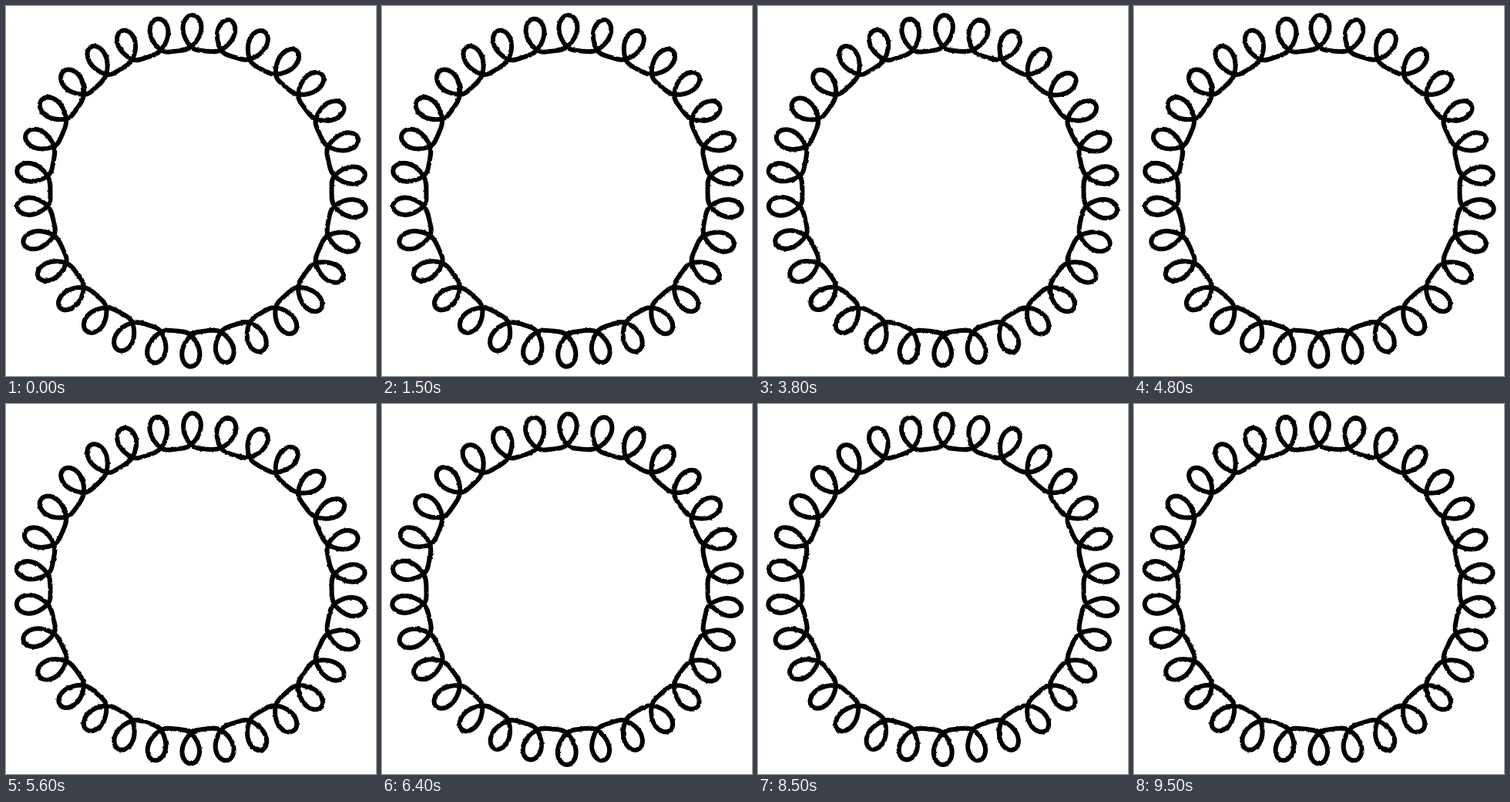
Animation, 480 px wide and 480 px high, one loop 9.6 s. Source, as an HTML page:

```html
<!DOCTYPE html>
<html lang="en">
<head>
<meta charset="utf-8">
<title>Wobbling loop ring</title>
<style>
  html, body { margin: 0; width: 100%; height: 100%; overflow: hidden; background: #fff; }
  svg { display: block; width: 100vw; height: 100vh; }
  path { fill: none; stroke: #000; stroke-width: 6; stroke-linejoin: round; }
</style>
</head>
<body>
<svg id="stage" viewBox="0 0 480 480"></svg>
<script>
const COUNT = 30, STEP = 2 * Math.PI / COUNT, MID = 240;
const KNOT = 187, VALLEY = 182.5, LENGTH = 40.3, WIDTH = 11.6;
const POSES = 3, POSE_MS = 100;

// Seeded generator of values from -1 to 1.
function random(seed) {
  return () => {
    seed = (seed * 16807) % 2147483647;
    return seed / 1073741823.5 - 1;
  };
}

const polar = (r, a) => [MID + r * Math.sin(a), MID - r * Math.cos(a)];

// Maps (outward, sideways) offsets from a point to stage points.
function frame([x, y], a) {
  const s = Math.sin(a), c = Math.cos(a);
  return (out, side) =>
    `${(x + s * out + c * side).toFixed(1)} ${(y - c * out + s * side).toFixed(1)} `;
}

function ringPath(pose) {
  const rnd = random(4211 + pose * 977);
  let d = "M" + polar(VALLEY, -STEP / 2).join(" ");
  for (let i = 0; i < COUNT; i++) {
    const a = i * STEP, knot = polar(KNOT, a);
    // Loops lean a little clockwise, least of all at the lower right.
    const lean = 0.06 - 0.035 * Math.cos(a - 2.4) + 0.03 * rnd();
    const len = LENGTH + 0.8 * rnd(), w = WIDTH + 0.5 * rnd();
    const ring = frame(knot, a), lobe = frame(knot, a + lean);
    const p = (out, side) => lobe(out * len, side * w);
    d += "C" + ring(-4.5, -11) + p(-0.12, -0.48) + p(0, 0)
      + "C" + p(0.15, 0.56) + p(0.39, 1) + p(0.6, 1)
      + "C" + p(0.82, 1) + p(1, 0.57) + p(1, 0)
      + "C" + p(1, -0.57) + p(0.82, -1) + p(0.6, -1)
      + "C" + p(0.39, -1) + p(0.15, -0.56) + p(0, 0)
      + "C" + p(-0.12, 0.48) + ring(-4.5, 11) + polar(VALLEY, a + STEP / 2).join(" ");
  }
  return d + "Z";
}

const stage = document.getElementById("stage");
stage.innerHTML = Array.from({ length: POSES }, (_, i) => `
  <filter id="rough${i}" filterUnits="userSpaceOnUse" x="0" y="0" width="480" height="480"
          color-interpolation-filters="sRGB">
    <feTurbulence type="fractalNoise" baseFrequency="0.16" numOctaves="2" seed="${i + 3}"/>
    <feDisplacementMap in="SourceGraphic" scale="2.4" xChannelSelector="R" yChannelSelector="G"/>
  </filter>
  <path d="${ringPath(i)}" filter="url(#rough${i})"/>`).join("");

const rings = [...stage.querySelectorAll("path")];
const start = performance.now();

function draw(now) {
  const pose = Math.floor(Math.max(0, now - start) / POSE_MS) % POSES;
  rings.forEach((ring, i) => { ring.style.visibility = i === pose ? "visible" : "hidden"; });
  requestAnimationFrame(draw);
}
draw(start);
</script>
</body>
</html>
```
